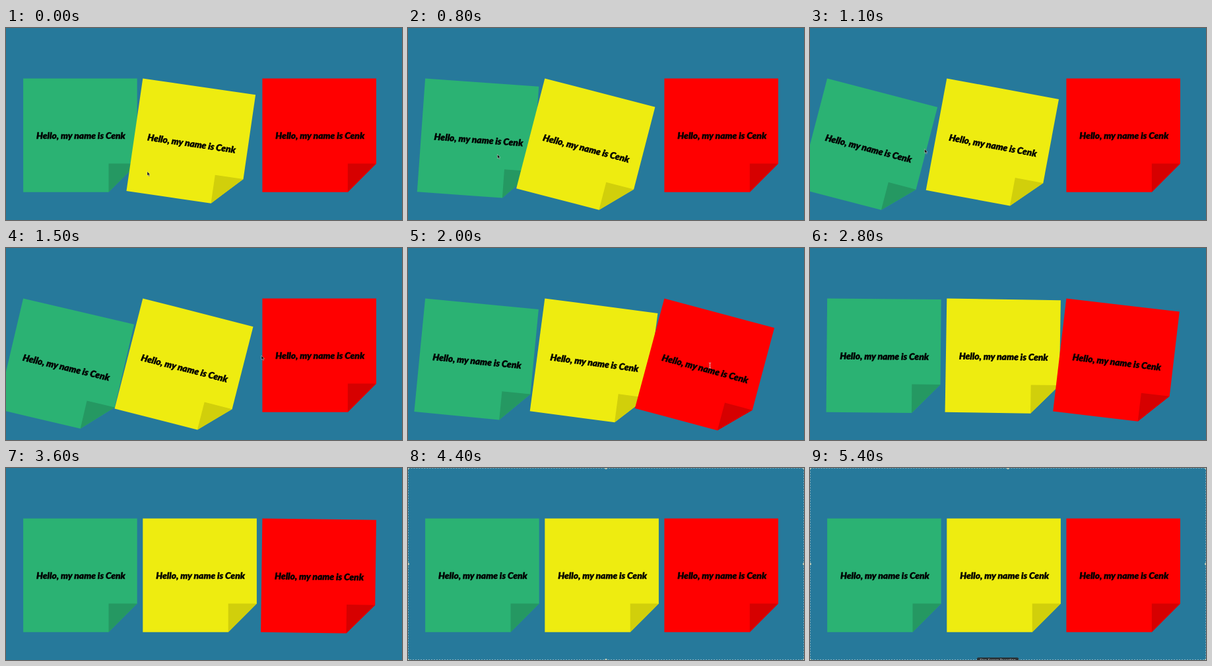
An HTML page for the animation above (5500 ms loop, 600 by 291 pixels).

```html
<!DOCTYPE html>
<html lang="en">
<head>
<meta charset="utf-8">
<title>Sticky notes</title>
<style>
  html, body { margin: 0; height: 100%; overflow: hidden; background: #26799b; }
  svg { display: block; width: 100vw; height: 100vh; }
  .label { font: italic 900 13.8px Lato, sans-serif; text-anchor: middle; stroke: #000; stroke-width: .4; }
  .tip { font: 5px Inter, sans-serif; fill: #ddd; text-anchor: middle; }
</style>
</head>
<body>
<svg viewBox="0 0 600 291">
  <g id="notes"></g>
  <path id="arrow" d="M0 0V6.2L1.5 5L2.6 7.4L3.6 6.9L2.6 4.7H4.4Z" fill="#111" stroke="#fff" stroke-width=".4"/>
  <path id="beam" d="M-1.6 -4Q0 -4 0 -3Q0 -4 1.6 -4M0 -3V3M-1.6 4Q0 4 0 3Q0 4 1.6 4" fill="none" stroke="#ccc" stroke-width=".9"/>
  <g id="frame">
    <rect x=".4" y=".4" width="599.2" height="290.2" fill="none" stroke="#a9c3cc" stroke-dasharray="2 2" stroke-width=".8"/>
    <g id="handles" fill="#c6cfba"></g>
  </g>
  <g id="tooltip">
    <rect x="253" y="287.3" width="63" height="10" rx="2" fill="#2b3033"/>
    <text class="tip" x="284.5" y="293">Stop Screen Recording</text>
  </g>
</svg>
<script>
const LOOP = 5500, STEP = 100, TILT = 15;
const $ = id => document.getElementById(id);

// moves: [start ms, duration ms, target angle]
const notes = [
  { x: 26.1, color: '#2bb273', fold: '#259862',
    moves: [[705, 500, TILT], [1270, 2000, 0]] },
  { x: 207.3, color: '#eeec10', fold: '#d1cf0b',
    moves: [[-160, 500, TILT], [700, 2000, 0], [1270, 240, TILT], [1440, 1960, 0]] },
  { x: 388.4, color: '#ff0000', fold: '#d60000',
    moves: [[1510, 480, TILT], [2160, 2000, 0]] }
];

// pointer path: [ms, x, y]
const path = [[0, 214, 217.5], [450, 62, 206], [600, 62, 206], [800, 135.5, 191.5],
  [1150, 180, 182], [1340, 361, 166], [1500, 387, 163], [2000, 457.5, 178], [2200, 546, 190]];

$('notes').innerHTML = notes.map(n => `<g>
  <path fill="${n.color}" d="M0 0H172.6V129L129.4 172.4H0Z"/>
  <path fill="${n.fold}" d="M129.4 129H172.6L129.4 172.4Z"/>
  <text class="label" x="87.3" y="92">Hello, my name is Cenk</text></g>`).join('');
$('handles').innerHTML = [0, 300, 600].flatMap(x => [0, 145.5, 291].map(y =>
  x === 300 && y === 145.5 ? '' : `<circle cx="${x}" cy="${y}" r="1.9"/>`)).join('');

// cubic-bezier(.25, .1, .25, 1)
function ease(p) {
  if (p <= 0 || p >= 1) return p <= 0 ? 0 : 1;
  const bezier = (a, b, s) => 3 * s * (1 - s) ** 2 * a + 3 * s * s * (1 - s) * b + s ** 3;
  let lo = 0, hi = 1;
  for (let i = 0; i < 24; i++) {
    const mid = (lo + hi) / 2;
    if (bezier(.25, .25, mid) < p) lo = mid; else hi = mid;
  }
  return bezier(.1, 1, lo);
}

function angleAt(moves, t) {
  let angle = 0;
  moves.forEach(([start, duration, target], i) => {
    const end = Math.min(t, moves[i + 1]?.[0] ?? Infinity);
    angle += (target - angle) * ease((end - start) / duration);
  });
  return angle;
}

function pointAt(t) {
  const i = Math.max(1, path.findIndex(p => p[0] >= t));
  const [a, b] = [path[i - 1], path[i]];
  const k = (t - a[0]) / (b[0] - a[0]);
  return [a[1] + (b[1] - a[1]) * k, a[2] + (b[2] - a[2]) * k];
}

const show = (id, on) => $(id).setAttribute('opacity', Number(on));

function draw(now) {
  const t = Math.floor(now % LOOP / STEP) * STEP;
  notes.forEach((n, i) => $('notes').children[i].setAttribute('transform',
    `translate(${n.x} 76.4) rotate(${angleAt(n.moves, t)})`));

  const visible = t <= 2200, overText = t >= 1900 && t <= 2000;
  if (visible) for (const id of ['arrow', 'beam'])
    $(id).setAttribute('transform', `translate(${pointAt(t)})`);
  show('arrow', visible && !overText);
  show('beam', overText);
  show('frame', t >= 4100);
  show('tooltip', Math.min(1, Math.max(0, (t - 4900) / 300)));
  requestAnimationFrame(draw);
}
requestAnimationFrame(draw);
</script>
</body>
</html>
```
